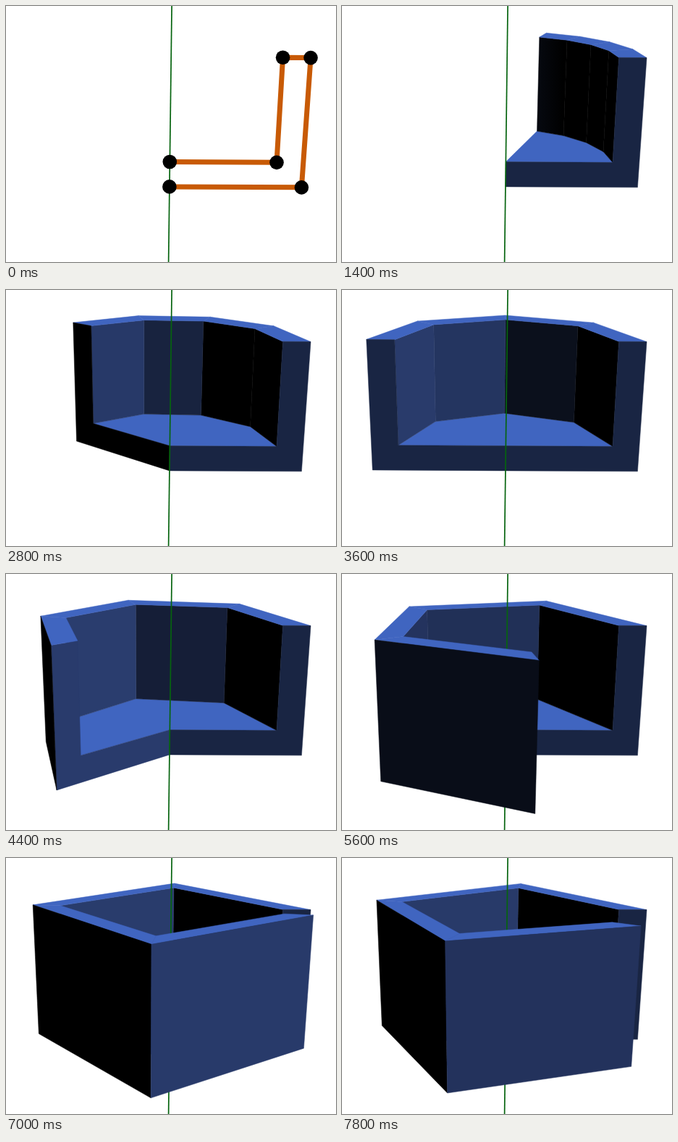
Write an HTML page with a canvas that moves like this. It is 456 px wide and 354 px high and loops after 8 s.

```html
<!DOCTYPE html>
<html lang="en">
<head>
<meta charset="utf-8">
<title>Revolved profile</title>
<style>
  html, body { margin: 0; width: 100%; height: 100%; overflow: hidden; background: #fff; }
  canvas { display: block; }
</style>
</head>
<body>
<canvas id="stage" width="456" height="354"></canvas>
<script>
const ctx = document.getElementById('stage').getContext('2d');
const STEP_MS = 200, STEPS = 40, SEGMENTS = 4, CREASE = 30;
const TOP = 'rgb(64,101,192)', AXIS = '#06640f', EDGE = '#c85a05';
const INNER = 4, OUTER = 5, FLOOR = 1, HEIGHT = 5;

// Half section of the solid as [radius, height]
const PROFILE = [[0, 0], [OUTER, 0], [OUTER, HEIGHT], [INNER, HEIGHT], [INNER, FLOOR], [0, FLOOR]];

const rad = deg => deg * Math.PI / 180;
const PITCH = rad(18.1), SIN = Math.sin(PITCH), COS = Math.cos(PITCH);
const FOCAL = 1040, DISTANCE = 28.4, ROLL = 0.0124, TURN = 1.1;

function project(radius, height, angle) {
  const a = rad(angle + TURN);
  const x = radius * Math.cos(a) - 0.033, z = radius * Math.sin(a);
  const scale = FOCAL / (DISTANCE + z * COS - height * SIN);
  const u = x * scale;
  const v = (height * COS + z * SIN - 1.98) * scale;
  return [228 + u + ROLL * v, 177.4 - v + ROLL * u];
}

function shade(normalAngle) {
  const a = rad(normalAngle);
  const b = Math.max(0, 88 * Math.cos(a) - 67 * Math.sin(a));
  return `rgb(${Math.round(b * 0.38)},${Math.round(b * 0.55)},${Math.round(b)})`;
}

function facesViewer(points) {
  let area = 0;
  points.forEach(([x, y], i) => {
    const [nx, ny] = points[(i + 1) % points.length];
    area += x * ny - nx * y;
  });
  return area < 0;
}

function trace(points) {
  ctx.beginPath();
  points.forEach(([x, y]) => ctx.lineTo(x, y));
}

function fill(points, paint) {
  trace(points);
  ctx.closePath();
  ctx.fillStyle = ctx.strokeStyle = paint;
  ctx.lineWidth = 0.5;
  ctx.fill();
  ctx.stroke();
}

function drawWall(radius, bottom, from, to, normalFrom, normalTo) {
  const quad = [
    project(radius, bottom, from), project(radius, bottom, to),
    project(radius, HEIGHT, to), project(radius, HEIGHT, from)
  ];
  if (!facesViewer(quad)) return;
  const paint = ctx.createLinearGradient(quad[0][0], 0, quad[1][0], 0);
  paint.addColorStop(0, shade(normalFrom));
  paint.addColorStop(1, shade(normalTo));
  fill(quad, paint);
}

function drawRim([from, to]) {
  fill([
    project(INNER, HEIGHT, from), project(OUTER, HEIGHT, from),
    project(OUTER, HEIGHT, to), project(INNER, HEIGHT, to)
  ], TOP);
}

const section = angle => PROFILE.map(([r, h]) => project(r, h, angle));

function drawAxis() {
  trace([[229.1, -1], [224.6, 355]]);
  ctx.strokeStyle = AXIS;
  ctx.lineWidth = 1.7;
  ctx.stroke();
}

function drawProfile() {
  const points = section(0);
  drawAxis();
  trace(points);
  ctx.strokeStyle = EDGE;
  ctx.lineWidth = 7;
  ctx.stroke();
  ctx.fillStyle = '#000';
  for (const [x, y] of points) {
    ctx.beginPath();
    ctx.arc(x, y, 9.8, 0, 2 * Math.PI);
    ctx.fill();
  }
}

function drawSolid(sweep) {
  const step = sweep / SEGMENTS;
  const angles = Array.from({ length: SEGMENTS + 1 }, (_, i) => i * step);
  const segments = angles.slice(1).map((to, i) => [angles[i], to]);
  const middle = ([from, to]) => (from + to) / 2;
  const isFront = segment => middle(segment) > 180;

  // Shallow creases are shaded smoothly, sharp ones flat
  const normal = (angle, segment) => step < CREASE
    ? Math.min(Math.max(angle, step / 2), sweep - step / 2)
    : middle(segment);

  fill([project(0, FLOOR, 0), ...angles.map(a => project(INNER, FLOOR, a))], TOP);
  for (const s of segments) {
    const [from, to] = s;
    drawWall(INNER, FLOOR, to, from, normal(to, s) + 180, normal(from, s) + 180);
  }
  segments.filter(s => !isFront(s)).forEach(drawRim);
  fill(section(0), shade(-90));
  const end = section(sweep).reverse();
  if (facesViewer(end)) fill(end, shade(sweep + 90));
  drawAxis();
  segments.filter(isFront).forEach(drawRim);
  for (const s of segments) {
    const [from, to] = s;
    drawWall(OUTER, 0, from, to, normal(from, s), normal(to, s));
  }
}

function render(now) {
  const step = Math.floor(now / STEP_MS) % STEPS;
  const sweep = 360 - Math.abs(360 - step * 10);
  ctx.fillStyle = '#fff';
  ctx.fillRect(0, 0, 456, 354);
  ctx.lineJoin = 'round';
  if (sweep) drawSolid(sweep);
  else drawProfile();
}

const start = performance.now();
function tick() {
  render(performance.now() - start);
  requestAnimationFrame(tick);
}
tick();
</script>
</body>
</html>
```
